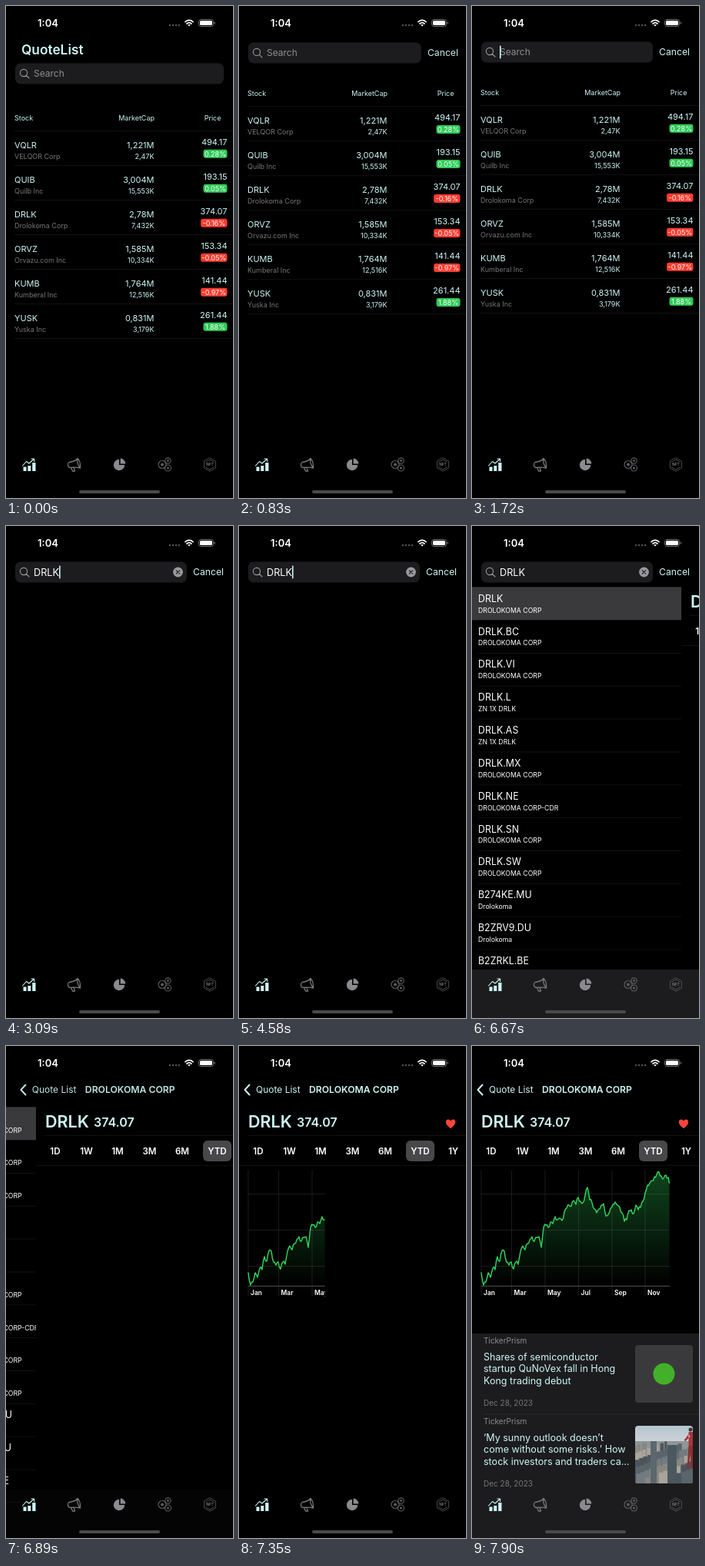
An HTML page with a canvas for the animation above (8000 ms loop, 295x640 px).

```html
<!DOCTYPE html>
<html lang="en">
<head>
<meta charset="utf-8">
<title>Stock list</title>
<style>
html, body { margin: 0; width: 100%; height: 100%; overflow: hidden; background: #000; }
canvas { display: block; width: 295px; height: 640px; }
</style>
</head>
<body>
<canvas id="stage"></canvas>
<script>
const W = 295, H = 640, LOOP = 8000;
const ICE = '#cdf6f5', WHITE = '#fff', GRAY = '#8e8e93', PANEL = '#1c1c1e', LINE = '#111112';
const GREEN = '#30cb58', RED = '#ff3b30';
const canvas = document.getElementById('stage'), c = canvas.getContext('2d');
const dpr = window.devicePixelRatio || 1;
canvas.width = W * dpr;
canvas.height = H * dpr;

const stocks = [
  ['VQLR', 'VELQOR Corp', '1,221M', '2,47K', '494.17', 0.28],
  ['QUIB', 'Quilb Inc', '3,004M', '15,553K', '193.15', 0.05],
  ['DRLK', 'Drolokoma Corp', '2,78M', '7,432K', '374.07', -0.16],
  ['ORVZ', 'Orvazu.com Inc', '1,585M', '10,334K', '153.34', -0.05],
  ['KUMB', 'Kumberal Inc', '1,764M', '12,516K', '141.44', -0.97],
  ['YUSK', 'Yuska Inc', '0,831M', '3,179K', '261.44', 1.88]
];
const CORP = 'DROLOKOMA CORP';
const named = (prefix, ends) => ends.split(' ').map(end => [prefix + end, CORP]);
const firstResults = [
  ...named('DRL', '.HA .MU .DE .HM .BE .DU .TG .F .SG K'),
  ['DRLY', 'VELD YIELD PRM STRT DRLK ETF'], ['DRLU', 'TRELVION DAILY DRLK BULL 1.5']
];
const finalResults = [
  ['DRLK', CORP], ...named('DRLK', '.BC .VI'),
  ['DRLK.L', 'ZN 1X DRLK'], ['DRLK.AS', 'ZN 1X DRLK'], ['DRLK.MX', CORP],
  ['DRLK.NE', CORP + '-CDR'], ...named('DRLK', '.SN .SW'),
  ['B274KE.MU', 'Drolokoma'], ['B2ZRV9.DU', 'Drolokoma'], ['B2ZRKL.BE', 'Drolokoma']
];
const news = [
  ['Shares of semiconductor', 'startup QuNoVex fall in Hong', 'Kong trading debut'],
  ['‘My sunny outlook doesn’t', 'come without some risks.’ How', 'stock investors and traders ca…']
];
// Price line heights, one every 3 px
const prices = [295, 311, 307, 295, 301, 289, 291, 274, 280, 266, 267, 281, 285, 281, 290, 281, 284,
  267, 260, 265, 257, 252, 248, 254, 249, 248, 262, 236, 233, 236, 229, 231, 222, 226, 224, 227, 216,
  211, 207, 208, 201, 206, 197, 202, 204, 194, 184, 200, 204, 212, 217, 212, 207, 205, 221, 219, 211,
  206, 203, 207, 210, 217, 228, 226, 214, 213, 218, 207, 213, 210, 202, 191, 181, 178, 175, 170, 167,
  164, 169, 172, 168, 171];

const typed = [[0, ''], [2250, 'D'], [2450, 'DR'], [3090, 'DRLK']];
const caret = [[0, 0], [1050, 1], [1190, .5], [1300, 0], [1600, .5], [1720, 1], [4220, 0], [4460, .5],
  [4580, 1], [5120, .5], [5240, 0], [5520, .5], [5640, 1], [6270, 0]];
const tableAlpha = [[0, 1], [2450, .5], [2580, .15], [2700, 0]];

const clamp = v => Math.max(0, Math.min(1, v));
const mix = (a, b, p) => a + (b - a) * p;
const held = (keys, t) => keys.filter(k => k[0] <= t).pop()[1];
// Moving parts advance in 110 ms ticks
function tick(t) {
  const start = [0, 500, 6450, 7350].filter(s => s <= t).pop();
  return start + Math.floor((t - start) / 110) * 110;
}
const smooth = v => { v = clamp(v); return v * v * (3 - 2 * v); };
function spring(ms) {
  const v = Math.max(0, ms) * .014;
  return v > 8 ? 1 : 1 - (1 + v) * Math.exp(-v);
}

// y is the middle of the capital letters
function text(s, x, y, size, color = ICE, weight = 400, align = 'left') {
  c.font = `${weight} ${size}px Inter, sans-serif`;
  c.textAlign = align;
  c.fillStyle = color;
  c.fillText(s, x, y + size * .364);
  return c.measureText(s).width;
}
function box(x, y, w, h, color, r = 0) {
  c.fillStyle = color;
  c.beginPath();
  c.roundRect(x, y, w, h, r);
  c.fill();
}
function disc(x, y, r, color) {
  c.fillStyle = color;
  c.beginPath();
  c.arc(x, y, r, 0, 7);
  c.fill();
}
function stroke(d, color, width = 1.2) {
  c.strokeStyle = color;
  c.lineWidth = width;
  c.lineCap = c.lineJoin = 'round';
  c.stroke(new Path2D(d));
}
function fill(d, color) {
  c.fillStyle = color;
  c.fill(new Path2D(d));
}
function layer(alpha, dx, draw) {
  if (alpha <= 0) return;
  c.save();
  c.globalAlpha *= alpha;
  c.translate(dx, 0);
  draw();
  c.restore();
}

function statusBar() {
  text('1:04', 41, 22, 13, WHITE, 600);
  for (let i = 0; i < 4; i++) disc(213 + i * 4, 25, 1.2, '#55555a');
  stroke('M233 20.6Q238 16.2 243 20.6M235 23Q238 20.4 241 23', WHITE, 1.7);
  fill('M236.2 24.6Q238 23.2 239.8 24.6L238 26.6Z', WHITE);
  c.strokeStyle = '#77777b';
  c.lineWidth = 1;
  c.beginPath();
  c.roundRect(250.5, 17.5, 19, 9, 3);
  c.stroke();
  box(252, 19, 16, 6, WHITE, 1.6);
  box(270.6, 20.5, 1.2, 3, '#77777b', .6);
}

function tabBar(panelAlpha) {
  layer(panelAlpha, 0, () => box(0, 577, W, 63, PANEL));
  box(22.5, 599.5, 4, 5.5, ICE);
  box(28.3, 598, 4, 7, ICE);
  box(34.2, 594, 4.3, 11, ICE);
  stroke('M21.5 598L26.5 592.5L30 595L36 589.5M33 589H36.6V592.4', ICE, 1.1);
  stroke('M82 593.5Q90 592.5 93 588.5Q97 592 96.5 601Q91 599.5 84 600.5Q80 600 80.5 596.5Q80.5 594 82 593.5ZM93 588.5Q91 594 96.5 601M84.5 600.5L86.5 605H89.5L88 600.2', '#77777b', 1.3);
  fill('M147 597V589.8A7.2 7.2 0 1 0 154.2 597Z', '#8b8b8f');
  fill('M148.6 595.4V588.6A7 7 0 0 1 155.4 595.4Z', '#8b8b8f');
  for (const [x, y, r] of [[203, 596.5, 5], [210.5, 591.5, 3.7], [210.5, 601, 4]]) {
    c.strokeStyle = '#5c5c60';
    c.lineWidth = 1.2;
    c.beginPath();
    c.arc(x, y, r, 0, 7);
    c.stroke();
    disc(x, y, r * .4, '#5c5c60');
  }
  stroke('M265 587.8L272.5 592.1V600.9L265 605.2L257.5 600.9V592.1ZM265 590L270.6 593.2M265 590L259.4 593.2M265 603L270.6 599.8M265 603L259.4 599.8', '#505054', .9);
  text('NFT', 265, 596.5, 4.6, '#77777b', 700, 'center');
  box(95, 630, 105, 4, '#4a4a4d', 2);
}

function stockTable(dy) {
  c.save();
  c.translate(0, dy);
  text('Stock', 11, 146, 9);
  text('MarketCap', 193, 146, 9, ICE, 400, 'right');
  text('Price', 279.5, 146, 9, ICE, 400, 'right');
  box(11, 162, 284, 1, LINE);
  stocks.forEach(([symbol, name, cap, volume, price, change], i) => {
    const y = 180.5 + i * 45;
    text(symbol, 11, y, 11);
    text(name, 11, y + 15.5, 9, '#77777b');
    text(cap, 192.5, y, 11, ICE, 400, 'right');
    text(volume, 192.5, y + 15.5, 9, ICE, 400, 'right');
    text(price, 287.5, y - 4, 11, ICE, 400, 'right');
    const label = change.toFixed(2) + '%', w = change < 0 ? 34.5 : 31;
    box(287.5 - w, y + 6.3, w, 11, change < 0 ? RED : GREEN, 3);
    text(label, 287.5 - w / 2, y + 11.8, 9, WHITE, 400, 'center');
    box(11, y + 26.5, 284, 1, LINE);
  });
  c.restore();
}

function searchBar(p, t) {
  const y = mix(88, 60, p), value = held(typed, t);
  box(12, y - 13.5, mix(271, 223, p), 27, PANEL, 7);
  stroke(`M27.6 ${y - 1}A4.6 4.6 0 1 1 18.4 ${y - 1}A4.6 4.6 0 1 1 27.6 ${y - 1}M26.4 ${y + 2.4}L30 ${y + 6}`, '#98989d', 1.1);
  let caretX = 36;
  if (value) {
    caretX += text(value, 36, y, 12.7, WHITE);
    disc(223.5, y, 6.4, '#98989d');
    stroke(`M221.3 ${y - 2.2}l4.4 4.4m0 -4.4l-4.4 4.4`, PANEL, 1.2);
  } else {
    text('Search', 36, y, 12, GRAY);
  }
  layer(held(caret, t), 0, () => box(caretX, y - 8.5, 1.6, 17, ICE, .8));
  layer(p, 0, () => text('Cancel', mix(300, 243, p), y, 12.2));
}

function resultList(rows, selected) {
  box(0, 79, W + 90, 1, LINE);
  rows.forEach(([symbol, name], i) => {
    const y = 79.5 + i * 42.83;
    if (selected && !i) box(0, y, W + 90, 43, '#3a3a3c');
    text(symbol, 15, y + 14.8, 12.4, WHITE);
    text(name, 15, y + 30, 8.7, WHITE);
    box(15, y + 42.6, W + 90, 1, LINE);
  });
}

function chart(progress) {
  if (progress <= 0) return;
  c.save();
  c.beginPath();
  c.rect(11, 155, 1 + 245 * progress, 175);
  c.clip();
  const columns = [12, 51.5, 95, 138.5, 182, 225];
  c.setLineDash([1, 1]);
  stroke(columns.map(x => `M${x} 162V326`).join('') +
    [192.5, 239.5, 286.5].map(y => `M12 ${y}H256.5`).join(''), '#2e2e2e', .7);
  c.setLineDash([]);
  let d = 'M12 295';
  prices.forEach((y, i) => {
    if (!i) return;
    const jitter = 2.6 * Math.sin(i * i);
    d += `L${10.5 + i * 3} ${(prices[i - 1] + y) / 2 + jitter}L${12 + i * 3} ${y}`;
  });
  d += 'L256.5 178';
  const shade = c.createLinearGradient(0, 165, 0, 312);
  shade.addColorStop(0, 'rgba(48,209,88,.32)');
  shade.addColorStop(1, 'rgba(48,209,88,0)');
  fill(d + 'V312H12Z', shade);
  stroke('M12 312.3H256.5', '#6a6a6d', .8);
  stroke(d, '#32d75d', 1.4);
  ['Jan', 'Mar', 'May', 'Jul', 'Sep', 'Nov'].forEach((m, i) =>
    text(m, columns[i] + 3, 321, 8.5, WHITE, 600));
  c.restore();
}

function cityPhoto(y) {
  c.save();
  c.beginPath();
  c.roundRect(212, y, 75, 75, 4);
  c.clip();
  const sky = c.createLinearGradient(0, y, 0, y + 26);
  sky.addColorStop(0, '#b4c6d0');
  sky.addColorStop(1, '#d2d6d6');
  box(212, y, 75, 75, sky);
  box(212, y + 20, 75, 55, '#8f9697');
  // Towers from the horizon to the foreground
  for (let i = 0; i < 70; i++) {
    const x = 209 + (i * 29.3) % 76, top = y + 17 + i * .62 + (i * 7) % 9;
    box(x, top, 3 + i % 4 + i / 18, 75, ['#727b80', '#a9a49c', '#59646b', '#898781', '#4b555b'][i % 5]);
  }
  box(232, y + 20, 8, 55, '#5c676e');
  box(254, y + 25, 12, 50, '#4c585f');
  disc(284, y + 5, 2.5, '#40302e');
  fill(`M281.5 ${y + 8}h6v18h-6zM281.5 ${y + 11}l-6 8 2 1 6 -6z`, '#a8343a');
  fill(`M281.5 ${y + 26}h6v30h-3l-1 -20 -2 20h-2z`, '#8c2c32');
  c.restore();
}

function newsList() {
  box(0, 374, W, 210, PANEL);
  news.forEach((lines, i) => {
    const y = 374 + i * 105;
    text('TickerPrism', 15, y + 9.5, 10, GRAY);
    lines.forEach((line, n) => text(line, 15, y + 30 + n * 15.8, 12.55, ICE));
    text('Dec 28, 2023', 15, y + 90, 10, '#77777b');
    if (i) {
      cityPhoto(y + 15);
    } else {
      box(212, y + 15, 75, 75, '#3a3a3c', 4);
      disc(249.5, y + 52.5, 14, '#43b02a');
      box(15, y + 104.5, 280, 1, '#2c2c2e');
    }
  });
}

function detailPage(q, t) {
  box(0, 76, W, H - 76, '#000');
  text('DRLK', 12, 98, 21.5, ICE, 600);
  text('374.07', 75, 99.5, 16, ICE, 600);
  fill('M275 107.2C271 104 268.8 101.8 268.8 99C268.8 95 273.4 94.4 275 97.6C276.6 94.4 281.2 95 281.2 99C281.2 101.8 279 104 275 107.2Z', '#ff453a');
  box(11, 116, 284, 1, LINE);
  box(217, 123, 37, 27, '#48484a', 6);
  ['1D', '1W', '1M', '3M', '6M', 'YTD', '1Y'].forEach((s, i) =>
    text(s, [25, 65.5, 106, 147.5, 190, 235.5, 278.5][i], 136.5, 11.6, WHITE, 600, 'center'));
  box(0, 155, W, 1, LINE);
  chart((1 - Math.cos(Math.PI * clamp((q - 6910) / 1000))) / 2);
  if (t >= 7680) newsList();
}

function detailNav() {
  stroke('M13.6 50.5L7.6 57L13.6 63.5', ICE, 1.9);
  text('Quote List', 22, 57, 12);
  text(CORP, 91, 57, 12.2, ICE, 600);
}

function render(t) {
  const q = tick(t), focus = smooth((q - 430) / 450), push = spring(q - 6637);
  c.setTransform(dpr, 0, 0, dpr, 0, 0);
  box(0, 0, W, H, '#000');

  layer(held(tableAlpha, t), 0, () => stockTable(-33 * focus));
  if (t >= 5410 && push < 1) {
    layer(1, -.3 * W * push, () =>
      resultList(t < 5520 ? firstResults : finalResults, t >= 6450));
  }
  if (push > 0) layer(1, Math.round(W * (1 - push)), () => detailPage(q, t));

  layer(1 - focus * 1.4, 0, () => text('QuoteList', 20, 57 - 28 * focus, 17.3, ICE, 600));
  layer(clamp(1.15 - push * 1.4), 0, () => searchBar(focus, t));
  layer(clamp((push - .15) * 1.3), 90 * (1 - push), detailNav);

  statusBar();
  tabBar(t < 5410 ? 0 : t < 7680 ? clamp(1.15 * (1 - push)) : 1);
}

function frame() {
  render(performance.now() % LOOP);
  requestAnimationFrame(frame);
}
frame();
</script>
</body>
</html>
```
